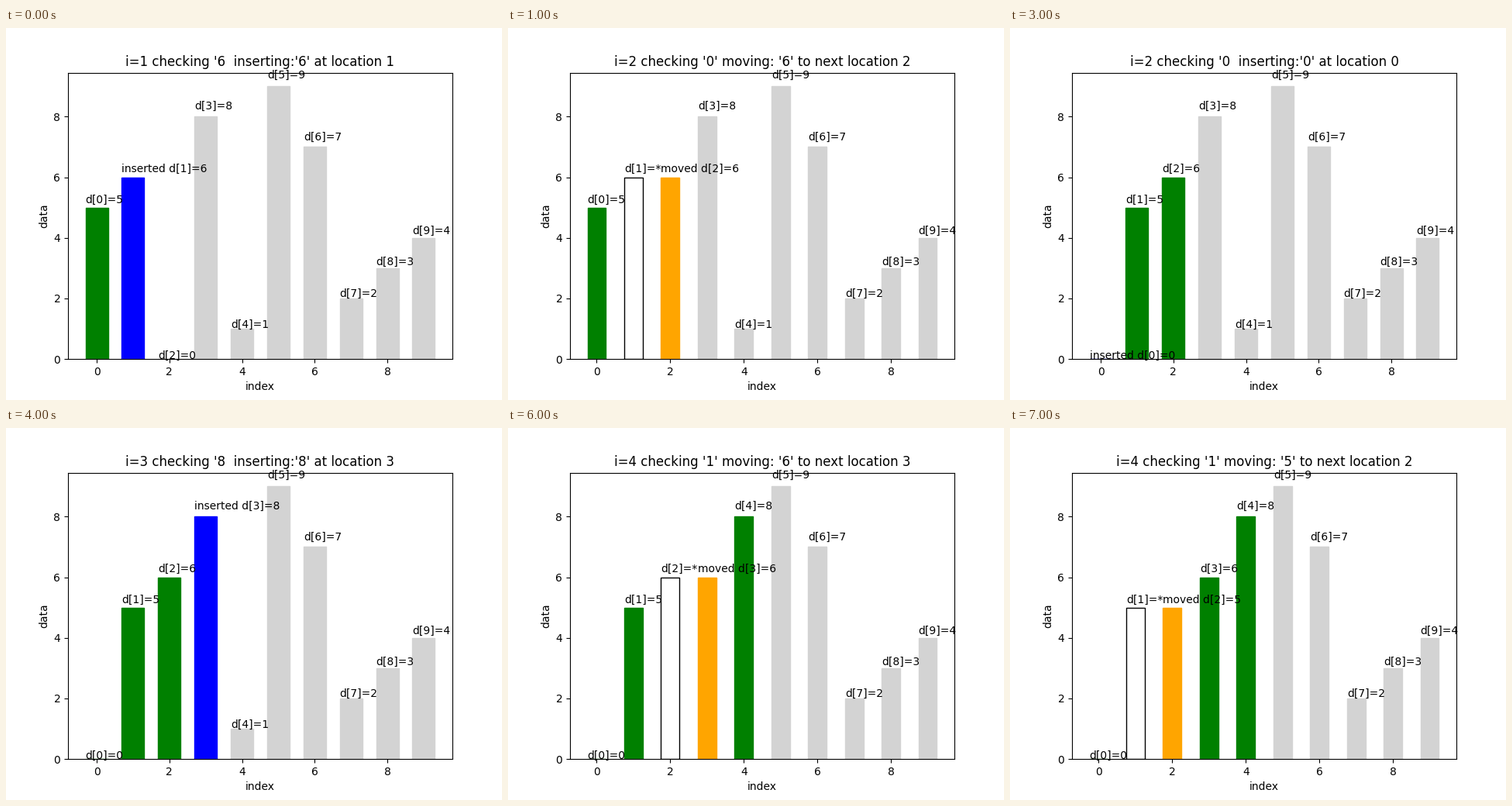
These frames come from a looping animation (640 px wide and 480 px high, 8000 ms). A matplotlib script:

```python
from itertools import islice

import matplotlib.pyplot as plt
from matplotlib.animation import FuncAnimation

VALUES = [5, 6, 0, 8, 1, 9, 7, 2, 3, 4]
STEPS = 8


def insertion_steps(values):
    """Yield (data, i, key, slot, moving) for each move and insertion."""
    data = list(values)
    for i in range(1, len(data)):
        key, slot = data[i], i
        while slot > 0 and data[slot - 1] > key:
            data[slot] = data[slot - 1]
            yield data[:], i, key, slot, True
            slot -= 1
        data[slot] = key
        yield data[:], i, key, slot, False


steps = list(islice(insertion_steps(VALUES), STEPS))
fig, ax = plt.subplots(figsize=(6.4, 4.8), dpi=100)


def bar_style(k, i, slot, moving):
    """Return fill, edge and label prefix of bar k."""
    if k == slot:
        return ("orange", "orange", "moved ") if moving else ("blue", "blue", "inserted ")
    if moving and k == slot - 1:
        return "white", "black", ""
    color = "green" if k <= i else "lightgray"
    return color, color, ""


def draw(frame):
    data, i, key, slot, moving = steps[frame]
    ax.clear()
    width = 0.5 if moving else 0.62
    styles = [bar_style(k, i, slot, moving) for k in range(len(data))]
    fills, edges, prefixes = zip(*styles)
    bars = ax.bar(range(len(data)), data, width, color=fills, edgecolor=edges)

    for k, (bar, value) in enumerate(zip(bars, data)):
        shown = "*" if moving and k == slot - 1 else value
        ax.text(bar.get_x(), 1.03 * value, f"{prefixes[k]}d[{k}]={shown}")

    if moving:
        title = f"i={i} checking '{key}' moving: '{data[slot]}' to next location {slot}"
    else:
        title = f"i={i} checking '{key}  inserting:'{key}' at location {slot}"
    ax.set_title(title)
    ax.set_xlabel("index")
    ax.set_ylabel("data")
    return []


anim = FuncAnimation(fig, draw, frames=STEPS, interval=1000,
                     init_func=lambda: draw(0), repeat=True, repeat_delay=0)
plt.show()
```
